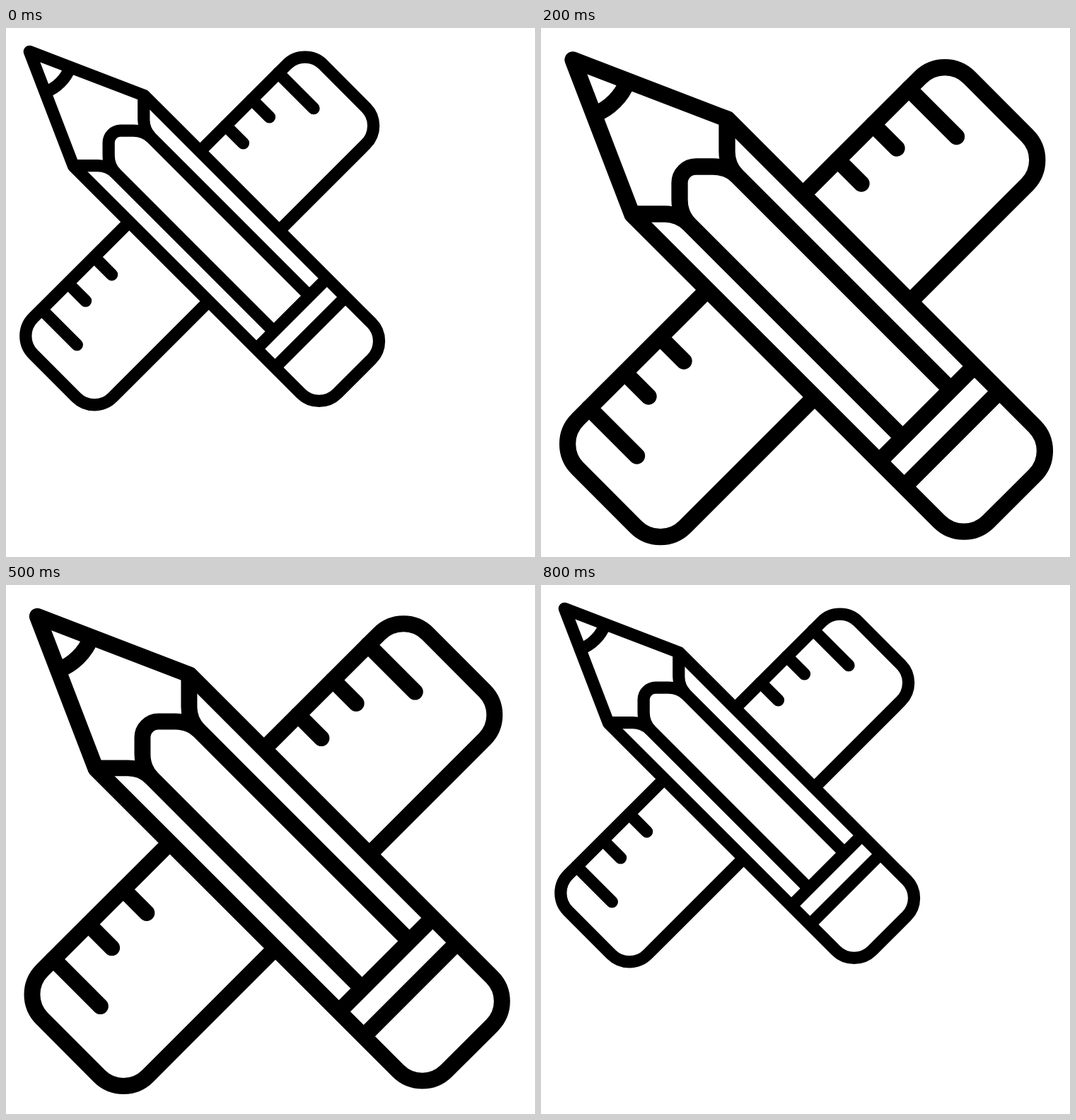
Write an HTML page that moves like this. It is 748x748 px and loops after 1600 ms.

```html
<!DOCTYPE html>
<html lang="en">
<head>
<meta charset="utf-8">
<title>Pencil and ruler</title>
<style>
  html, body { margin: 0; width: 100%; height: 100%; overflow: hidden; background: #fff; }
  svg { display: block; width: 100vw; height: 100vh; }
</style>
</head>
<body>
<svg viewBox="0 0 748 748">
  <g id="icon" fill="none" stroke="#000" stroke-width="23.3" stroke-linejoin="round">
    <path id="ruler" d="M536.4 69.9 A49 49 0 0 1 605.6 69.9 L687.6 152.3 A49 49 0 0 1 687.6 221.2
      L203.5 705.3 A49 49 0 0 1 134.3 705.5 L51.8 622.7 A49 49 0 0 1 51.8 553.6 Z"/>
    <path id="ticks" stroke-linecap="round"/>
    <path id="pencil" fill="#fff" d="M45 45 L264 129 L698.2 563.4 A49 49 0 0 1 698.2 632.4
      L632.4 698 A49 49 0 0 1 563.4 698 L129 264 Z"/>
    <path id="lead" d="M122.5 75 A83 83 0 0 1 75 122.5"/>
    <path id="collar" d="M263 129 V175 Q263 195 277 209 M129 263 H175 Q195 263 209 277"/>
    <path id="core" d="M579.5 511.5 L278 210 Q264 196 243 196 H219 A23 23 0 0 0 196 219
      V243 Q196 264 210 278 L511.5 579.5"/>
    <path id="ferrule" d="M613 478 L478 613 M648.5 513.5 L513.5 648.5"/>
  </g>
</svg>
<script>
  const LOOP = 1600, STEP = 20, DRAWN_SCALE = 1.3505;
  const icon = document.getElementById('icon');

  // Ticks run at 45 degrees from the ruler's edge: x, y, length along each axis.
  const ticks = [
    [520, 86, 67.5], [469.5, 136.5, 33.5], [419.5, 186.5, 33.5],
    [168.5, 437.5, 33.5], [118.5, 487.5, 33.5], [68, 537.5, 67.5]
  ];
  document.getElementById('ticks').setAttribute('d',
    ticks.map(([x, y, n]) => `M${x} ${y}l${n} ${n}`).join(''));

  function bezier(x1, y1, x2, y2) {
    const at = (a, b, u) => 3 * (1 - u) * (1 - u) * u * a + 3 * (1 - u) * u * u * b + u * u * u;
    return x => {
      let lo = 0, hi = 1;
      for (let i = 0; i < 30; i++) {
        const mid = (lo + hi) / 2;
        if (at(x1, x2, mid) < x) lo = mid; else hi = mid;
      }
      return at(y1, y2, (lo + hi) / 2);
    };
  }

  const ease = bezier(0.25, 0.1, 0.25, 1);
  const grow = bezier(0.3, 0.2, 0.62, 1);

  // Time, horizontal scale, vertical scale, easing towards this key.
  const keys = [
    [0, 1, 1],
    [200, 1.3505, 1.3505, grow],
    [400, 1.311, 1.311, ease],
    [560, 1.3315, 1.3315, ease],
    [660, 0.98, 1.02, ease],
    [800, 1, 1, ease]
  ];

  function scaleAt(t) {
    const i = keys.findIndex(k => k[0] > t);
    if (i < 0) return [1, 1];
    const a = keys[i - 1], b = keys[i];
    const p = b[3]((t - a[0]) / (b[0] - a[0]));
    return [1, 2].map(n => a[n] + (b[n] - a[n]) * p);
  }

  function draw(t) {
    const [sx, sy] = scaleAt(t);
    icon.setAttribute('transform', `scale(${sx / DRAWN_SCALE} ${sy / DRAWN_SCALE})`);
  }

  const start = performance.now();
  function tick() {
    const t = (performance.now() - start) % LOOP;
    draw(Math.floor(t / STEP) * STEP);
    requestAnimationFrame(tick);
  }
  tick();
</script>
</body>
</html>
```
